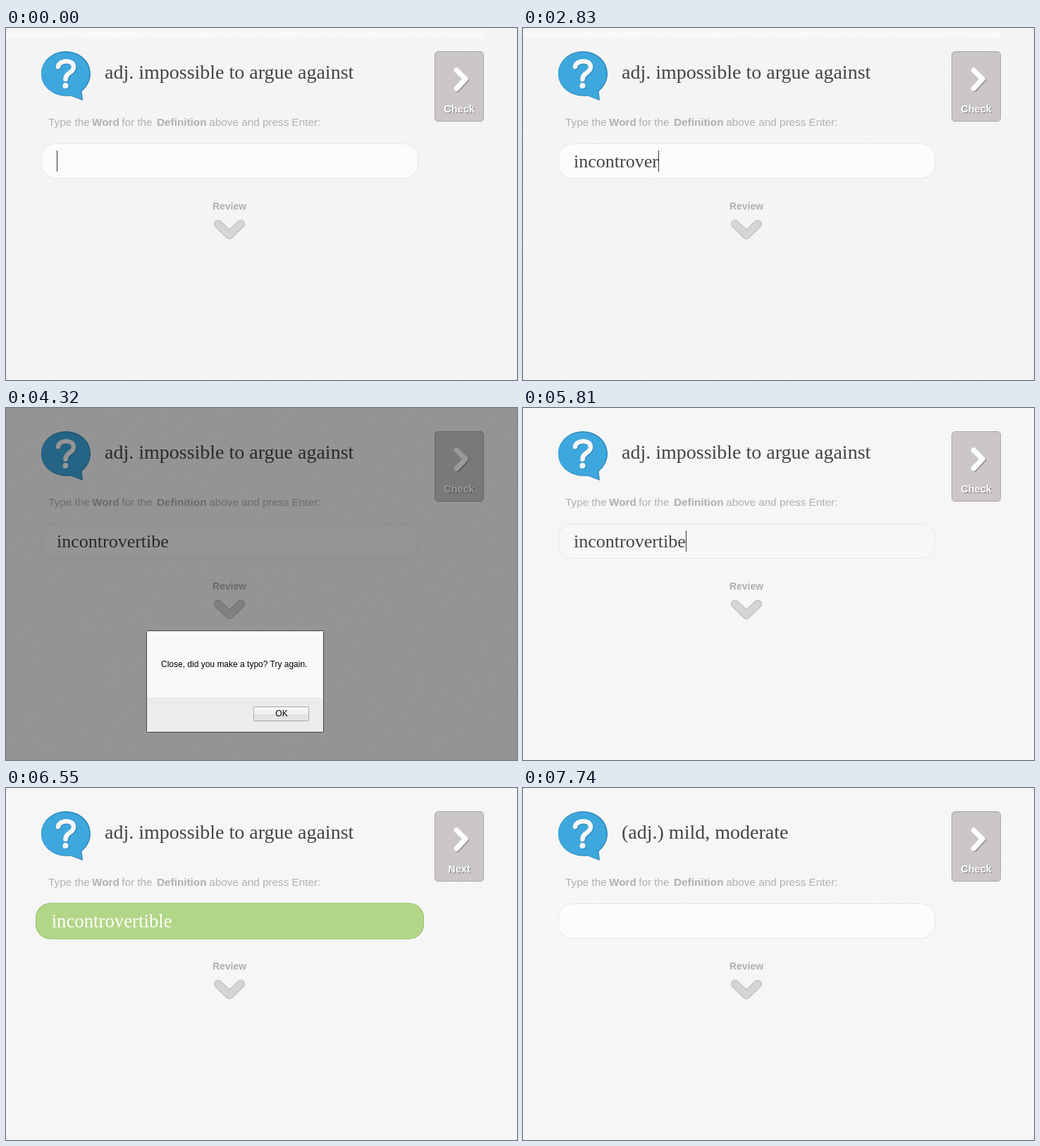
These frames come from a looping animation (725x500 px, 8 s). An HTML page:

```html
<!DOCTYPE html>
<html lang="en">
<head>
<meta charset="utf-8">
<title>Vocabulary quiz</title>
<style>
  html, body { margin: 0; width: 100%; height: 100%; overflow: hidden; background: #f6f6f6; }
  svg { display: block; width: 725px; height: 500px; }
  text { font-family: "Liberation Sans", Arial, sans-serif; white-space: pre; }
  .serif { font-family: "Liberation Serif", "Times New Roman", serif; fill: #444; }
  .bold { font-weight: bold; }
  .hint { font-size: 15.3px; fill: #b0b0b0; }
  .stroke { fill: none; stroke-linecap: round; stroke-linejoin: round; }
  .raised { filter: drop-shadow(1px 1px 0 #858181); }
  .crisp { shape-rendering: crispEdges; }
</style>
</head>
<body>
<svg viewBox="0 0 725 500">
  <defs>
    <linearGradient id="buttonFace" x2="0" y2="1">
      <stop offset="0" stop-color="#fafafa"/><stop offset=".5" stop-color="#f0f0f0"/>
      <stop offset=".5" stop-color="#e0e0e0"/><stop offset="1" stop-color="#e6e6e6"/>
    </linearGradient>
    <clipPath id="grainClip"><rect id="grainArea"/></clipPath>
  </defs>

  <rect id="page" width="725" height="500"/>
  <rect id="topStrip" y="5" width="678" height="9" fill="#f9f9f9"/>
  <g clip-path="url(#grainClip)"><path id="grain" fill="#fff" opacity=".6"/></g>

  <!-- question bubble -->
  <path d="M85 33C104.500 33 120 47 120 65C120 75 115 84 107.500 90L109 103L92 96.500C68 99 50 84 50 65C50 47 65.500 33 85 33Z" fill="#2d88b8"/>
  <path d="M84.500 34.500C103 34.500 118.500 47.500 118.500 65C118.500 75 113.500 83.500 106 89.500L107.500 101.500L92 95.500C68 98 50 83.500 50 65C50 48 65.500 34.500 84.500 34.500Z" fill="#3ea7dd"/>
  <g style="filter:drop-shadow(1.500px 1.500px 0 #2d88b8)">
    <path class="stroke" d="M74 55C75 45 96 44 96 55.500C96 64 84.500 63 84.500 73" stroke="#f8f8f8" stroke-width="6.500"/>
    <circle cx="84.500" cy="82" r="4" fill="#f8f8f8"/>
  </g>

  <text id="title" class="serif" x="140" y="72" font-size="28"></text>
  <text class="hint" y="139"><tspan x="60">Type the </tspan><tspan x="122" class="bold">Word</tspan><tspan x="160"> for the </tspan><tspan x="214" class="bold">Definition</tspan><tspan x="284"> above and press Enter:</tspan></text>

  <!-- check / next button -->
  <rect x="608.5" y="33.5" width="69" height="99" rx="4.500" fill="#cbc7c7" stroke="#a9a5a5"/>
  <path class="stroke raised" d="M639.500 60L652 72.500L639.500 86" stroke="#fff" stroke-width="7.500"/>
  <text id="action" class="bold raised" x="643" y="120" font-size="14.5" fill="#fff" text-anchor="middle"></text>

  <!-- answer field -->
  <g id="field">
    <rect id="box" x="50.5" y="164.5" width="534" height="49" rx="20"/>
    <text id="answer" class="serif" x="72" y="198" font-size="26"></text>
  </g>
  <rect id="caret" class="crisp" y="174" width="1" height="30" fill="#333"/>

  <text class="bold" x="317" y="258" font-size="14" fill="#b0b0b0" text-anchor="middle">Review</text>
  <path class="stroke" d="M301 278.500L317 294L333 278.500" stroke="#b9b9b9" stroke-width="12"/>
  <path class="stroke" d="M301 278.500L317 294L333 278.500" stroke="#d5d5d5" stroke-width="10"/>

  <g id="dialog">
    <rect width="725" height="500" opacity=".4"/>
    <rect x="199.5" y="316.5" width="251" height="144" rx="1" fill="#f9f9f9" stroke="#444"/>
    <rect x="200" y="411" width="250" height="49" fill="#ececec"/>
    <text x="220" y="368" font-size="12">Close, did you make a typo? Try again.</text>
    <rect x="351.5" y="424.5" width="78" height="20" rx="1" fill="url(#buttonFace)" stroke="#a6a6a6"/>
    <text x="391" y="438" font-size="12" text-anchor="middle">OK</text>
  </g>
</svg>
<script>
const LOOP = 8000, DIALOG = 4320, CLOSED = 5810, CORRECT = 6550, NEXT = 7290;
const WORD = "incontrovertible";
const $ = id => document.getElementById(id);
const set = (id, attrs) => {
  for (const name in attrs) $(id).setAttribute(name, attrs[name]);
};
const show = (id, visible) => set(id, { visibility: visible ? "visible" : "hidden" });

// [start time, typed text, caret visible]
const typing = [
  [0, "", true], [450, "", false], [1060, "", true],
  [1640, "i", true], [1790, "inc", true], [1940, "inco", true],
  [2080, "incon", true], [2230, "incont", true], [2380, "incontro", true],
  [2680, "incontrov", true], [2830, "incontrover", true], [2980, "incontrovert", true],
  [3120, "incontroverti", true], [3270, "incontrovertib", true], [3870, "incontrovertib", false],
  [4020, "incontrovertibe", true], [DIALOG, "incontrovertibe", false], [CLOSED, "incontrovertibe", true],
  [6110, "incontrovertib", true], [6260, WORD, true],
  [CORRECT, WORD, false], [NEXT, "", true], [7740, "", false]
];
const pulse = [[CORRECT, 1.03], [6700, 1.022], [6840, 1.014], [6990, 1.006], [7140, 1]];
// [start time, x, y, width, height] of the visible paper grain
const grainAreas = [
  [0, 0, 14, 678, 486], [DIALOG, 0, 0, 725, 500], [CLOSED, 0, 0, 0, 0],
  [CORRECT, 594, 110, 70, 105], [NEXT, 40, 22, 685, 288]
];
const at = (keys, t) => keys.findLast(key => key[0] <= t) || keys[0];

let seed = 7;
const random = () => (seed = seed * 16807 % 2147483647) / 2147483647;
let specks = "";
for (let i = 0; i < 7000; i++) {
  specks += `M${random() * 725 | 0} ${random() * 500 | 0}h${random() < .3 ? 2 : 1}v1h-1z`;
}
set("grain", { d: specks });

function draw(t) {
  const [, text, caretOn] = at(typing, t);
  const [, x, y, width, height] = at(grainAreas, t);
  const correct = t >= CORRECT && t < NEXT;
  const flat = t >= CLOSED && t < CORRECT;
  const scale = correct ? at(pulse, t)[1] : 1;

  set("page", { fill: t < DIALOG ? "#f4f4f4" : "#f6f6f6" });
  set("grainArea", { x, y, width, height });
  show("topStrip", t < DIALOG);
  $("title").textContent = t < NEXT ? "adj. impossible to argue against" : "(adj.) mild, moderate";
  $("action").textContent = correct ? "Next" : "Check";
  $("answer").textContent = text;
  $("answer").style.fill = correct ? "#fff" : "#444";
  set("box", {
    fill: correct ? "#b2d687" : flat ? "#f7f7f7" : t >= DIALOG && t < CLOSED ? "#f8f8f8" : "#fcfcfc",
    stroke: correct ? "#98c36b" : "#e7e7e7"
  });
  set("field", { transform: `translate(317.5 189) scale(${scale}) translate(-317.5 -189)` });
  set("caret", { x: Math.round(72 + (text ? $("answer").getComputedTextLength() : 0)) });
  show("caret", caretOn);
  show("dialog", t >= DIALOG && t < CLOSED);
}

const start = performance.now();
function tick() {
  draw((performance.now() - start) % LOOP);
  requestAnimationFrame(tick);
}
tick();
</script>
</body>
</html>
```
